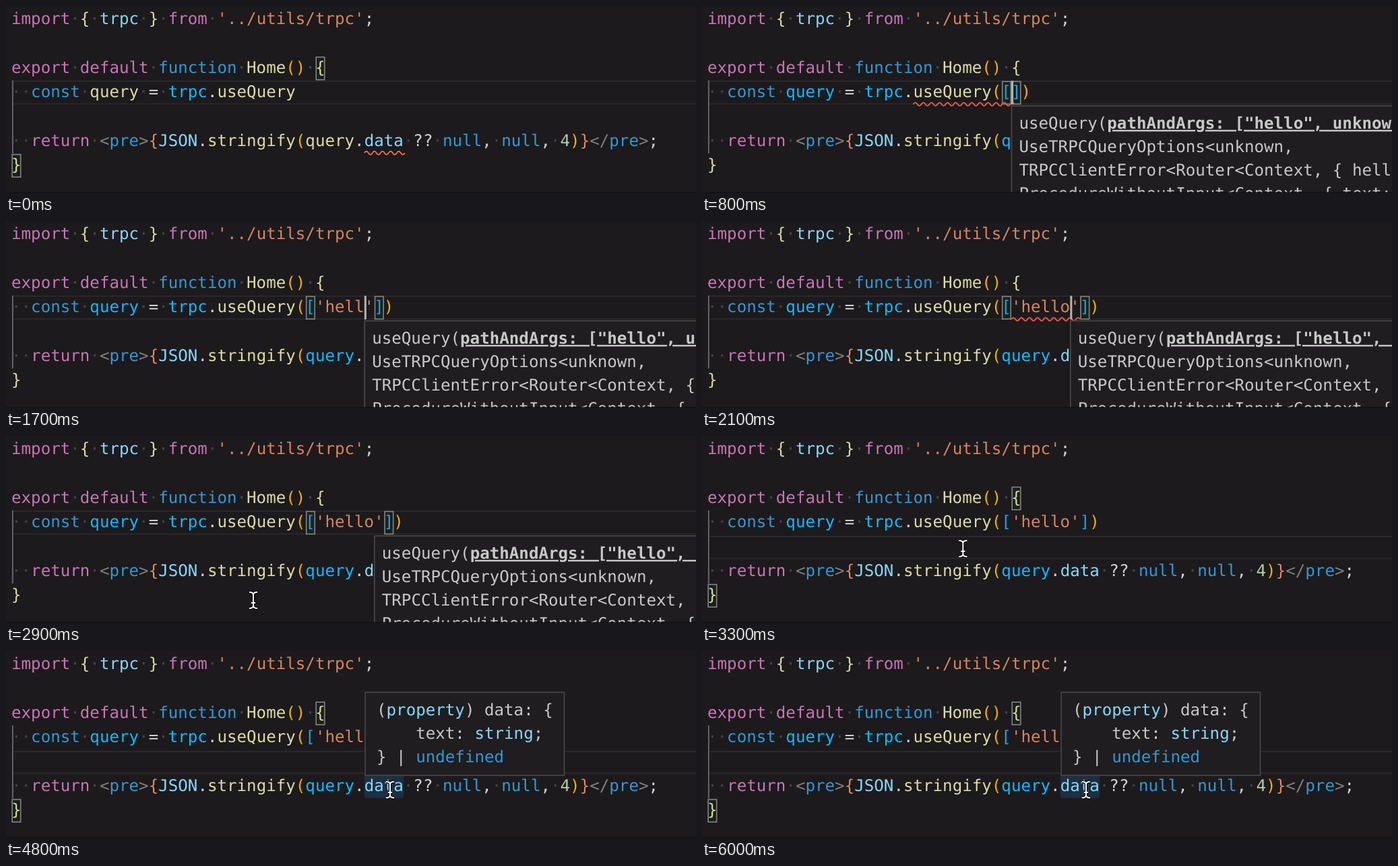
Animation of 1024 by 279 pixels, one loop 6100 ms. Source, as an HTML page:

```html
<!DOCTYPE html>
<html lang="en">
<head>
<meta charset="utf-8">
<style>
  html, body { margin: 0; width: 100%; height: 100%; overflow: hidden; background: #1c1a1c; }
  svg { display: block; width: 1024px; height: 279px; }
  text { font: 24.17px "DejaVu Sans Mono", monospace; white-space: pre; text-rendering: geometricPrecision; }
  .keyword { fill: #c974b6 }
  .string { fill: #d9845f }
  .blue { fill: #3398d4 }
  .prop { fill: #86d8ff }
  .func { fill: #dcdca4 }
  .const { fill: #10baff }
  .gold { fill: #f2b00c }
  .bracket { fill: #1ba2ee }
  .brace { fill: #e58a5a }
  .tag { fill: #808080 }
  .num { fill: #b5cea8 }
  .plain { fill: #d4d4d4 }
  .hint { fill: #c8c8c8 }
  .space { fill: #454345 }
  .active { font-weight: bold; text-decoration: underline; }
  .pair { fill: #0064001a; stroke: #858585; stroke-width: 1.6 }
  .panel { fill: #1f1d1f; stroke: #4a4a4a; stroke-width: 1.6 }
  .wave { fill: none; stroke-width: 1.9 }
</style>
</head>
<body>
<svg id="stage" viewBox="0 0 1024 279"></svg>
<script>
const LOOP = 6100, STEP = 100;
const CHAR = 14.55, LINE = 36.3, LEFT = 8, PANEL_LINE = 35;
const stage = document.getElementById('stage');

const colX = col => LEFT + col * CHAR;
const lineTop = n => 2.2 + (n - 1) * LINE;
const baseline = n => 27 + (n - 1) * LINE;
const escapeText = s => s.replace(/&/g, '&amp;').replace(/</g, '&lt;').replace(/>/g, '&gt;');

// Tokens alternate between a class name and its text.
function text(x, y, tokens, dots) {
  let out = '';
  for (let i = 0; i < tokens.length; i += 2) {
    let s = escapeText(tokens[i + 1]);
    if (dots) s = s.replace(/ /g, '<tspan class="space">·</tspan>');
    out += `<tspan class="${tokens[i]}">${s}</tspan>`;
  }
  return `<text x="${x}" y="${y}">${out}</text>`;
}

const code = (n, tokens) => text(LEFT, baseline(n), tokens, true);

const rect = (x, y, w, h, attrs) =>
  `<rect x="${x}" y="${y}" width="${w}" height="${h}" ${attrs}/>`;

const pairBox = (n, col) =>
  rect(colX(col) + 1.2, lineTop(n) + 1.5, CHAR - 2, LINE - 2.6, 'class="pair"');

function squiggle(n, from, to, color) {
  const end = colX(to), y = lineTop(n) + 33.5;
  let d = `M${colX(from)} ${y + 2}`;
  for (let x = colX(from), up = true; x < end - 1; x += 6, up = !up) {
    d += `q3 ${up ? -5 : 5} 6 0`;
  }
  return `<path class="wave" d="${d}" stroke="${color}"/>`;
}

function currentLine(n) {
  const y = lineTop(n);
  return rect(10, y + (n === 5 ? 1.6 : 0), 1014, 2, 'fill="#2a282a"') +
         rect(10, y + LINE - 2.2, 1014, 2, 'fill="#2a282a"');
}

function signature(x) {
  const rows = [
    ['hint', 'useQuery(', 'hint active', 'pathAndArgs: ["hello", unknown?]'],
    ['hint', 'UseTRPCQueryOptions<unknown,'],
    ['hint', 'TRPCClientError<Router<Context, { hello:'],
    ['hint', 'ProcedureWithoutInput<Context, { text: string']
  ];
  return rect(x, 149, 1100, 200, 'class="panel"') +
    rows.map((row, i) => text(x + 11, 182.8 + i * PANEL_LINE, row)).join('');
}

function tooltip() {
  const rows = [
    ['hint', '(', 'prop', 'property', 'hint', ') data: {'],
    ['hint', '    text: ', 'prop', 'string', 'hint', ';'],
    ['hint', '} | ', 'blue', 'undefined']
  ];
  return rect(533, 61.5, 295.5, 124, 'class="panel"') +
    rows.map((row, i) => text(550, 95.8 + i * PANEL_LINE, row)).join('');
}

const pointerPath = [
  [2400, 318, 300], [2700, 360, 250], [2900, 367, 245], [3100, 378, 168],
  [3400, 392, 168], [3800, 556, 201], [3900, 562, 203], [4100, 570, 207]
];

function pointer(t) {
  if (t < pointerPath[0][0]) return '';
  let [, x, y] = pointerPath[pointerPath.length - 1];
  const i = pointerPath.findIndex(p => p[0] > t);
  if (i > 0) {
    const [t0, x0, y0] = pointerPath[i - 1], [t1, x1, y1] = pointerPath[i];
    const k = (t - t0) / (t1 - t0);
    x = x0 + (x1 - x0) * k;
    y = y0 + (y1 - y0) * k;
  }
  const d = 'M-6 -12Q0 -12 0 -8Q0 -12 6 -12M0 -8V8M-6 12Q0 12 0 8Q0 12 6 12M-3 4H3';
  return `<g transform="translate(${x} ${y})" fill="none">
    <path d="${d}" stroke="#000" stroke-width="4.5"/><path d="${d}" stroke="#fff" stroke-width="2"/></g>`;
}

// Typing times for the paren, the bracket, the quote and each letter.
const keys = { paren: 300, bracket: 700, quote: 1000, letters: [1300, 1400, 1600, 1700, 1800] };
const CLICK = 3200;

function frame(t) {
  const paren = t >= keys.paren, bracket = t >= keys.bracket, quote = t >= keys.quote;
  const clicked = t >= CLICK, editing = paren && !clicked;
  const word = 'hello'.slice(0, keys.letters.filter(k => t >= k).length);
  const caretCol = 29 + paren + bracket + quote + word.length;
  const query = t >= 600 ? 'const' : 'func';
  const hover = t >= 4400;

  const call = [];
  if (paren) call.push('gold', '(');
  if (bracket) call.push('bracket', '[');
  if (quote) call.push('string', `'${word}'`);
  if (bracket) call.push('bracket', ']');
  if (paren) call.push('gold', ')');

  let out = currentLine(clicked ? 5 : 4);
  out += rect(9, 111, 1.8, 109, 'fill="#6c6a6c"');
  if (hover) out += rect(colX(36), lineTop(6) + .5, 4 * CHAR, LINE - 1, 'fill="#1d3042"');

  if (editing) {
    const open = bracket ? 30 : 29;
    out += pairBox(4, open) + pairBox(4, open + 1 + (quote ? 2 : 0) + word.length);
  } else {
    out += pairBox(3, 31) + pairBox(7, 0);
  }

  out += code(1, ['keyword', 'import ', 'func', '{ ', 'prop', 'trpc ', 'func', '} ',
    'keyword', 'from ', 'string', "'../utils/trpc'", 'plain', ';']);
  out += code(3, ['keyword', 'export default ', 'blue', 'function ', 'func', 'Home',
    'gold', '() ', 'func', '{']);
  out += code(4, ['blue', '  const ', query, 'query ', 'plain', '= ', 'const', 'trpc',
    'plain', '.', 'func', 'useQuery', ...call]);
  out += code(6, ['blue', '  return ', 'tag', '<', 'blue', 'pre', 'tag', '>', 'brace', '{',
    'prop', 'JSON', 'plain', '.', 'func', 'stringify', 'gold', '(', query, 'query',
    'plain', '.', 'prop', 'data ', 'plain', '?? ', 'blue', 'null', 'plain', ', ',
    'blue', 'null', 'plain', ', ', 'num', '4', 'gold', ')', 'brace', '}',
    'tag', '</', 'blue', 'pre', 'tag', '>', 'plain', ';'].map((s, i) =>
      i === 0 ? 'keyword' : s));
  out += code(7, ['func', '}']);

  if (t < 600) out += squiggle(6, 36, 40, '#f0684a');
  if (t >= 600 && t < 1400) out += squiggle(4, 21, 31, '#f0584c');
  if (t >= 1900 && t < 2500) out += squiggle(4, 31, 38, '#f0584c');

  if (editing) {
    out += signature(colX(caretCol) + .4);
    if (t < 2400 || t >= 3000) {
      out += rect(colX(caretCol), lineTop(4) + .5, 3, LINE - 1, 'fill="#b4b4b0"');
    }
  }
  if (hover) out += tooltip();
  out += rect(0, 277.6, 1024, 1.4, 'fill="#111012"');
  return out + pointer(t);
}

let shown = -1;
function play(now) {
  const t = Math.floor((now % LOOP) / STEP) * STEP;
  if (t !== shown) {
    stage.innerHTML = frame(t);
    shown = t;
  }
  requestAnimationFrame(play);
}
play(0);
</script>
</body>
</html>
```
